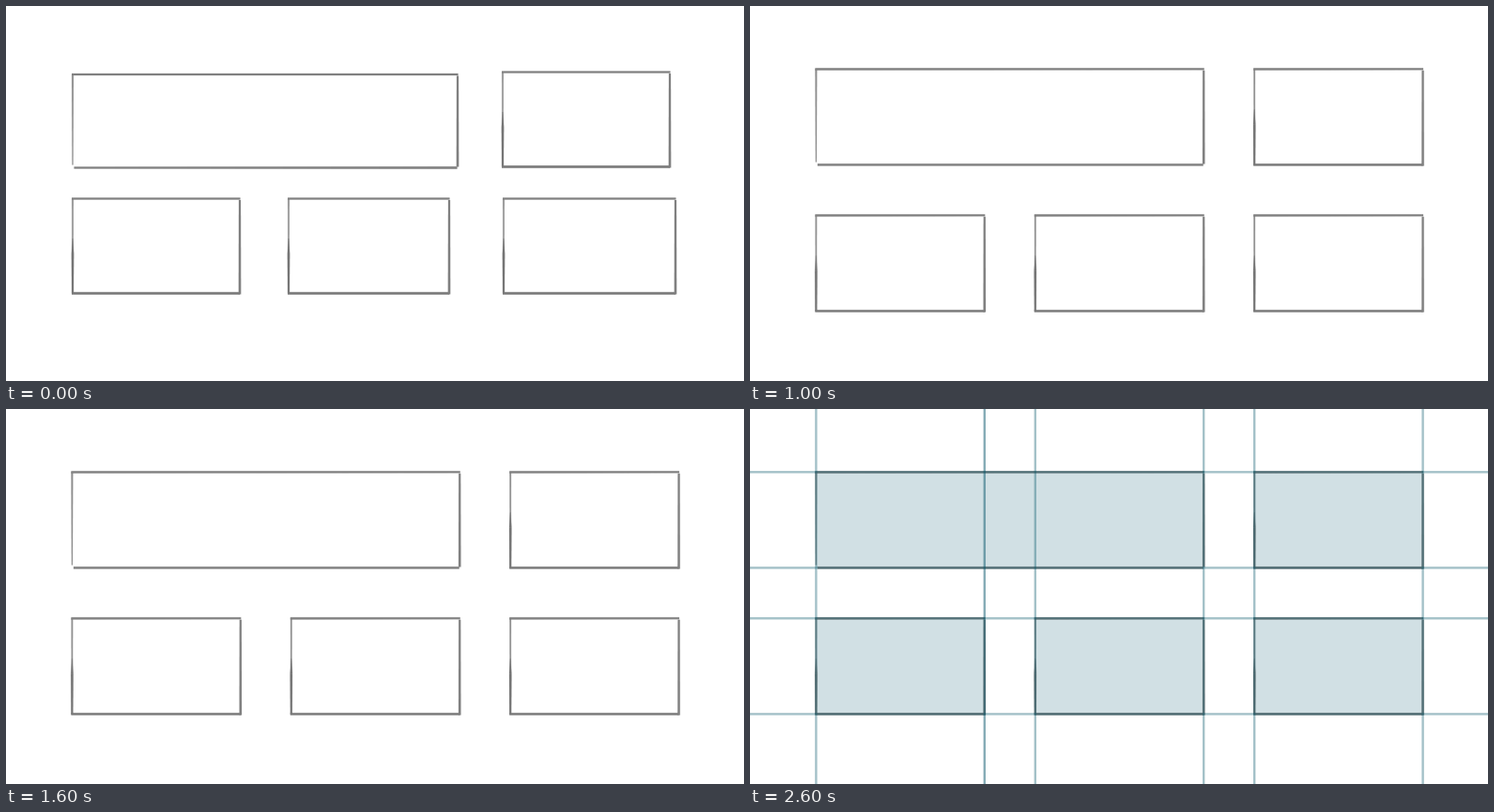
These frames come from a looping animation (786x400 px, 3 s). An HTML page with a canvas:

```html
<!DOCTYPE html>
<html lang="en">
<head>
<meta charset="utf-8">
<style>
html, body { margin: 0; width: 100%; height: 100%; overflow: hidden; background: #fff; }
canvas { display: block; }
</style>
</head>
<body>
<canvas id="stage" width="786" height="400"></canvas>
<script>
const ctx = document.getElementById('stage').getContext('2d');

// Both layouts are regular grids; the rough one also lets each box slip.
const roughGrid = { x: 71, y: 70.5, stepX: 229.5, stepY: 135, width: 178, height: 101 };
const exactGrid = { x: 70.4, y: 67.3, stepX: 233.4, stepY: 156, width: 179.4, height: 102.1 };
const boxes = [
  { col: 0, row: 0, span: 2, slip: { top: 2.5, right: 2.5, bottom: 1 } },
  { col: 2, row: 0, span: 1, slip: { left: -1, right: -1 } },
  { col: 0, row: 1, span: 1, slip: {} },
  { col: 1, row: 1, span: 1, slip: { left: 0.5, right: -6.5 } },
  { col: 2, row: 1, span: 1, slip: { right: 5 } }
];
const tint = alpha => `rgba(0, 83, 104, ${alpha})`;

function place({ col, row, span }, grid, { left = 0, top = 0, right = 0, bottom = 0 }) {
  const x = grid.x + col * grid.stepX, y = grid.y + row * grid.stepY;
  return {
    l: x + left,
    t: y + top,
    r: x + (span - 1) * grid.stepX + grid.width + right,
    b: y + grid.height + bottom
  };
}

function taper(x1, y1, x2, y2, w1, w2) {
  const length = Math.hypot(x2 - x1, y2 - y1);
  const nx = (y1 - y2) / length / 2, ny = (x2 - x1) / length / 2;
  ctx.beginPath();
  ctx.moveTo(x1 + nx * w1, y1 + ny * w1);
  ctx.lineTo(x2 + nx * w2, y2 + ny * w2);
  ctx.lineTo(x2 - nx * w2, y2 - ny * w2);
  ctx.lineTo(x1 - nx * w1, y1 - ny * w1);
  ctx.fill();
}

// A pencil line: a tapered core with a faint soft edge.
function pencil(x1, y1, x2, y2, w1, w2, grey = '#808080') {
  ctx.fillStyle = grey;
  ctx.globalAlpha = 0.25;
  taper(x1, y1, x2, y2, w1 + 1, w2 + 1);
  ctx.globalAlpha = 1;
  taper(x1, y1, x2, y2, w1, w2);
}

function sketchBox({ l, t, r, b }, wide) {
  if (wide) {
    pencil(l, t, l, b - 3, 1.8, 1, '#8c8c8c');
    pencil(l + 1.5, b, r - 0.5, b, 2.2, 2.4);
  } else {
    const middle = t + (b - t) * 0.42, lower = t + (b - t) * 0.58;
    pencil(l, t, l, b, 1.6, 1.2, '#909090');
    pencil(l, middle, l, lower, 0.4, 2.4, '#757575');
    pencil(l, lower, l, b, 2.4, 1.8, '#757575');
    pencil(l - 1, b, r, b, 2.4, 2.4, '#787878');
  }
  pencil(l - 1, t, r + 0.5, t, 2.2, 2);
  pencil(r, t + 1.5, r, wide ? b - 1 : b + 1, 2, 2.4);
}

function drawGuides(grid) {
  for (let col = 0; col < 3; col++) {
    for (const side of [0, grid.width]) {
      const strong = col === 0 && side > 0;
      ctx.fillStyle = tint(strong ? 0.48 : 0.36);
      ctx.fillRect(grid.x + col * grid.stepX + side - 1.2, 0, 2.4, 400);
    }
  }
  ctx.fillStyle = tint(0.36);
  for (let row = 0; row < 2; row++) {
    for (const side of [0, grid.height]) {
      ctx.fillRect(0, grid.y + row * grid.stepY + side - 1.2, 786, 2.4);
    }
  }
}

function draw(step) {
  const grid = step === 0 ? roughGrid : exactGrid;
  ctx.clearRect(0, 0, 786, 400);
  for (const box of boxes) {
    const area = place(box, grid, step === 0 ? box.slip : {});
    if (step === 2) {
      ctx.fillStyle = tint(0.18);
      ctx.fillRect(area.l, area.t, area.r - area.l, area.b - area.t);
    }
    sketchBox(area, box.span > 1);
  }
  if (step === 2) drawGuides(grid);
}

function tick() {
  draw(Math.floor(performance.now() % 3000 / 1000));
  requestAnimationFrame(tick);
}
tick();
</script>
</body>
</html>
```
